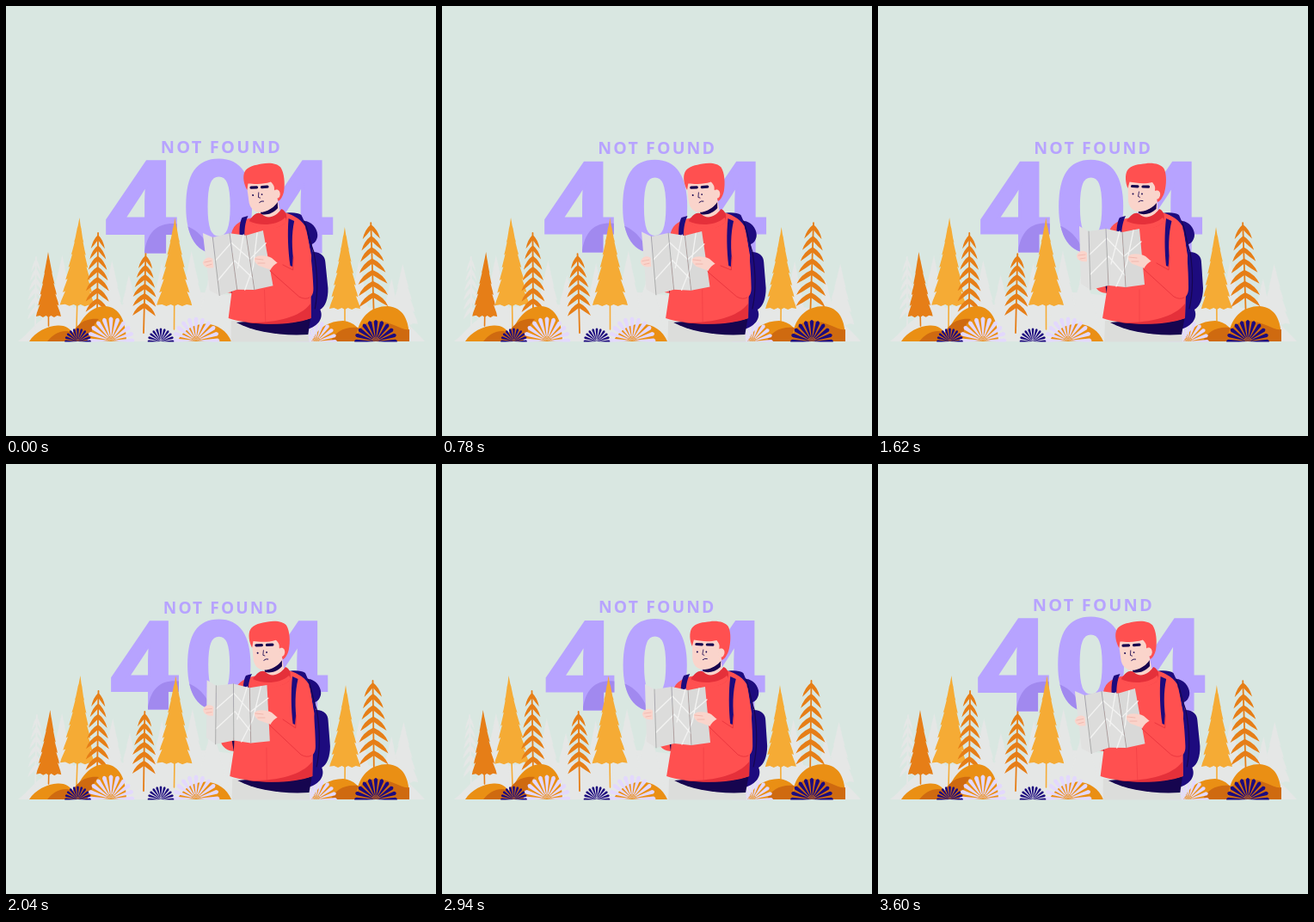
These frames come from a looping animation (500x500 px, 3630 ms). An HTML page:

```html
<!DOCTYPE html>
<html lang="en">
<head>
<meta charset="utf-8">
<title>Not found</title>
<style>
html, body { margin: 0; width: 100%; height: 100%; overflow: hidden; background: #d9e7e1; }
svg { display: block; width: 100vw; height: 100vh; }
text { font-family: "Open Sans", "Noto Sans", sans-serif; font-weight: 700; text-anchor: middle; }
</style>
</head>
<body>
<svg id="stage" viewBox="0 0 500 500"></svg>
<script>
// The cycle closes at CYCLE and its end pose rests for one step
const LOOP = 3630, CYCLE = 3600, STEP = 30, SWAY = CYCLE / 2;
const C = {
  mist: '#e5e7e6', yellow: '#f5ab35', orange: '#e67e17', hill: '#ea8f14', brown: '#cf6a10',
  navy: '#1d0b7e', ink: '#16054f', lilac: '#e3d8fd', violet: '#b7a3ff', shade: '#a189ef',
  red: '#ff5050', deep: '#e5303a', skin: '#fad4cb', blush: '#eeb0a6'
};
const stage = document.getElementById('stage');
const r1 = n => Math.round(n * 10) / 10;
const shape = (d, fill, extra = '') => `<path d="${d}" fill="${fill}" ${extra}/>`;
const line = (d, color, w = 1, extra = '') =>
  `<path d="${d}" fill="none" stroke="${color}" stroke-width="${w}" stroke-linecap="round" stroke-linejoin="round" ${extra}/>`;

// Conifer with its trunk foot at the origin
function fir(h, half, trunk, tiers, color) {
  const right = [], left = [], crown = h - trunk, gap = crown / tiers;
  const edge = (x, y) => {
    right.push(`${r1(x)} ${r1(y)}`);
    left.unshift(`${r1(-x)} ${r1(y)}`);
  };
  for (let i = 1; i <= tiers; i++) {
    const y = -h + gap * i, w = half * i / tiers;
    edge(w - half * 0.07, y - gap * 0.35);
    edge(w, y);
    if (i < tiers) edge(w * 0.83, y - 1.5);
  }
  const hem = [0.7, 0.45, 0.2, 0, -0.2, -0.45, -0.7].map((k, i) => `${r1(half * k)} ${-trunk + (i % 2 ? 1 : -1)}`);
  return shape(`M0 ${-h}L${right.join(' ')} ${hem.join(' ')} ${left.join(' ')}Z`, color) +
    line(`M0 0V${-trunk - 4}`, color, 1.6);
}

// Thin trunk with drooping, leaf-shaped branches
function fern(h, half, trunk, pairs, color) {
  const gap = (h - trunk - 8) / pairs;
  let d = '';
  for (let i = 0; i < pairs; i++) {
    const y = -h + 2 + i * gap, w = half * (0.6 + 0.4 * Math.min(1, i / (pairs - 3))), drop = gap * 0.75 + 7;
    for (const s of [-1, 1])
      d += `M0 ${r1(y)}Q${r1(s * w * 0.75)} ${r1(y + drop * 0.35)} ${r1(s * w)} ${r1(y + drop)}` +
           `Q${r1(s * w * 0.55)} ${r1(y + drop * 0.75)} 0 ${r1(y + 6)}Z`;
  }
  return shape(d, color) + line(`M0 0V${-h}`, color, 1.8);
}

// Half wheel of wedge petals
function fan(x, y, r, color, n = 11) {
  const gap = Math.PI / (n - 1), half = gap * 0.31;
  let d = '';
  for (let i = 0; i < n; i++) {
    const a = gap * i;
    const p = (q, k) => `${r1(x + Math.cos(q) * r * k)} ${r1(y - Math.sin(q) * r * k)}`;
    d += `M${x} ${y}L${p(a - half, 0.92)}Q${p(a, 1.08)} ${p(a + half, 0.92)}Z`;
  }
  return shape(d + `M${x - r * 0.2} ${y}a${r * 0.2} ${r * 0.2} 0 0 1 ${r * 0.4} 0Z`, color);
}

// x, y of the foot, height, sway in px at the tip, phase in degrees, drawing
const trees = [];
const tree = (x, y, h, amp, phase, art) => {
  trees.push({ x, y, amp, phase, h });
  return `<g data-tree="${trees.length - 1}">${art}</g>`;
};
const firAt = (x, y, h, half, trunk, tiers, color, amp, phase) =>
  tree(x, y, h, amp, phase, fir(h, half, trunk, tiers, color));
const fernAt = (x, y, h, half, trunk, pairs, color, amp, phase) =>
  tree(x, y, h, amp, phase, fern(h, half, trunk, pairs, color));

const digits = [[157.3, 4], [247.6, 0], [338.8, 4]]
  .map(([x, n]) => `<text x="${x}" y="286.4" font-size="147.5">${n}</text>`).join('');

const sign = `<g id="sign">
  <g fill="${C.violet}" stroke="${C.violet}" stroke-width="3.2">${digits}</g>
  <g mask="url(#digits)"><path d="M160 292C163 262 176 253 194 253C216 253 234 268 240 292Z" fill="${C.shade}"/></g>
  <text x="250.3" y="171" font-size="20" letter-spacing="2.2" fill="${C.violet}">NOT FOUND</text>
</g>`;

const mist = shape('M14 390C28 380 34 366 52 359C90 342 130 350 160 346C190 338 215 330 240 334C300 340 360 352 410 350C448 350 466 366 487 390Z', C.mist) +
  fernAt(34, 376, 84, 9, 10, 6, C.mist, 2, 60) +
  firAt(64, 380, 90, 19, 6, 5, C.mist, 1.5, 10) +
  firAt(123, 380, 84, 18, 6, 5, C.mist, 1.5, 80) +
  firAt(144, 385, 72, 16, 6, 4, C.mist, 1.5, 140) +
  firAt(180, 385, 86, 18, 6, 5, C.mist, 1.5, 30) +
  firAt(216, 385, 100, 21, 6, 5, C.mist, 1.5, 100) +
  firAt(240, 385, 80, 20, 6, 4, C.mist, 1.5, 160) +
  firAt(410, 385, 88, 18, 6, 5, C.mist, 1.5, 70) +
  firAt(447, 385, 68, 14, 6, 4, C.mist, 1.5, 20) +
  firAt(462, 382, 82, 17, 12, 5, C.mist, 1.5, 120);

const wood =
  firAt(49.5, 372, 86, 14.5, 11, 6, C.orange, 3, 100) +
  firAt(82, 374, 128, 20, 26, 7, C.yellow, 4.5, 40) +
  fernAt(106, 362, 98, 13.5, 4, 7, C.orange, 1.5, 45) +
  fernAt(160, 380, 92, 13.5, 18, 6, C.orange, 2.5, -10) +
  firAt(195.5, 376, 130, 20.5, 28, 7, C.yellow, 2, 60) +
  firAt(394, 370, 113, 18, 18, 7, C.yellow, 1.5, 95) +
  fernAt(428, 366, 114, 17, 14, 7, C.orange, 4, 160);

const hills =
  shape('M27 390C34 379 48 372 60 371.5C68 371 74 374 77 380L80 390Z', C.hill) +
  shape('M48 390C56 380 66 376 76 379L82 390Z', C.brown) +
  shape('M78 390C84 364 99 349 115 349C129 350 139 360 140 390Z', C.hill) +
  shape('M74 390C78 371 92 362 108 364C101 370 98 380 99 390Z', C.brown) +
  shape('M199 390C207 376 218 370 232 369.5C246 370 257 378 262 390Z', C.hill) +
  shape('M355 390C362 374 376 366 392 366C404 367 414 376 417 390Z', C.hill) +
  shape('M378 390C382 379 394 372 410 374L418 390Z', C.brown) +
  shape('M407 390C408 362 424 349 444 349C462 351 469 364 469 390Z', C.hill) +
  shape('M407 390C408 376 416 366 432 366C450 368 462 378 469 376V390Z', C.brown) +
  fan(122, 389, 27.5, C.lilac) + fan(83.5, 390, 15.5, C.navy) +
  fan(221, 389, 27.5, C.lilac) + fan(180, 390, 15.5, C.navy) +
  fan(361, 390, 24, C.lilac) + fan(430, 390, 25, C.navy);

const back =
  shape('M316 246C324 240 344 238 350 243L353 250C361 250 368 258 368 266C368 272 364 276 361 277L362 286C372 286 376 292 376 298L378 328C378 340 374 350 368 353C372 362 366 372 352 376H336Z', C.navy) +
  line('M353 250C358 261 358 274 363 286C366 306 367 330 362 352', C.ink, 1.2);

const trunk =
  shape('M264 366L263 392H354L352 364Z', '#dcdddb') +
  shape('M270 368C290 379 322 384 353 382L357 360Z', C.ink) +
  shape('M250 320L268 318L267 334C259 334 252 330 250 320Z', C.red) +
  shape('M264 322L271 322L266 335Z', C.ink) +
  shape('M294 246C281 248 271 253 268 264L268 300L266 332L261 363C284 371 330 372 357 363L358 335L360 290L354 256C348 246 338 242 327 239Z', C.red) +
  shape('M282 368C312 369 344 363 357 346V363C336 371 306 371 282 368Z', C.deep) +
  line('M304 330V368', C.deep, 0.7, 'opacity=".55"') +
  shape('M281 246L288 244C284 252 283 261 283 271H277.5C277 260 278 251 281 246Z', C.navy) +
  shape('M335 247L341.5 250C338 264 337 282 340 304L335 302C333 284 333 264 335 247Z', C.navy);

const head =
  shape('M302 228L324 222L326 246C319 251 309 250 303 244Z', C.skin) +
  shape('M303 236C311 239 318 236 324 229L323.5 236C317 242 309 243.5 303 241Z', C.ink) +
  shape('M290.5 200L291 227C292 235 297 239 305 239C315 238.5 323 231 325 222V200Z', C.skin) +
  shape('M290.5 212C287.5 205 287 196 290 191C294 184.5 304 184 311 183.2C320 182 329 184 332.5 189C336 196 335.5 208 333 217C331 223 328 227 325 228L322 214C323 210 321 207.5 319 205C309 207.5 299 205.5 292.5 204.5Z', C.red) +
  shape('M321 216C325 212.5 329 215.5 328 220.5C327 225 323 226 321 223Z', C.skin) +
  line('M295.5 209.5L302 209.8M308 210L314.5 210.2', C.ink, 3.2) +
  `<circle cx="296.5" cy="218.5" r="1"/><circle cx="307" cy="218.5" r=".9"/>` +
  line('M303.5 216L302.5 221.5L304.5 222.3', C.ink, 0.8) +
  line('M303 227.5Q305.5 225.5 308 226.5', C.ink, 0.9);

const collar =
  shape('M289 250C295 241 300 239 304 242C310 248 320 246 327 236C333 238 335 247 330 253C319 261 298 261 289 250Z', C.deep) +
  shape('M289 250C300 256 320 256 331 246C333 249 332 251 330 253C319 262 298 262 289 250Z', C.red);

const chart =
  shape('M234 256L245 262L247 330L236 323Z', '#e1e1e0') +
  shape('M245 262L265 259L268 325L247 330Z', '#dcdcdb') +
  shape('M265 259L284 263L288 327L268 325Z', '#dfdfde') +
  shape('M284 263L304 259L310 324L288 327Z', '#d9d9d8') +
  line('M246 289L266 270L286 291L306 274M247 312L268 291L287 313M271 300L281 262M277 326L289 300L297 261', '#f3f3f2', 1.3) +
  line('M245 262L247 330M265 259L268 325M284 263L288 327', '#969696', 0.7);

const farHand =
  shape('M243 287C239 283 233 285 231 290C231 295 236 298 243 297Z', C.skin) +
  line('M233 290L241 289M235 294L241 293', C.blush, 0.7);
const nearHand =
  shape('M291 291C295 287 305 288 311 291L319 298L312 306C306 303 301 302 296 300C292 297 290 294 291 291Z', C.skin) +
  line('M292 292L301 293M295 297L303 297', C.blush, 0.8);

stage.innerHTML = `<defs>
  <clipPath id="floor"><rect width="500" height="390.5"/></clipPath>
  <mask id="digits" maskUnits="userSpaceOnUse" x="0" y="0" width="500" height="500">
    <g fill="#fff" stroke="#fff" stroke-width="3.2">${digits}</g></mask>
</defs>
<rect width="500" height="500" fill="#d9e7e1"/>
<g clip-path="url(#floor)">${mist}${sign}${wood}${hills}
  <g class="lean">${back}${trunk}</g>
  <g class="lean"><g id="head" fill="${C.ink}">${head}</g>${collar}</g>
  <g id="chart">${chart}${farHand}</g>
  <g id="hand">${nearHand}</g>
  <path id="sleeve" fill="${C.red}"/>
  <path id="seam" fill="none" stroke="${C.deep}" stroke-width=".8" stroke-linecap="round"/>
</g>`;

const el = id => document.getElementById(id);
const treeEls = [...stage.querySelectorAll('[data-tree]')];
const leanEls = [...stage.querySelectorAll('.lean')];
const put = (node, tf) => node.setAttribute('transform', tf);

// Smooth periodic curve through poses at these times
const times = [0, 780, 1620, 2040, 2550, 2940];
const pose = {
  zoom: [1, 0.977, 0.977, 0.955, 0.951, 0.966],
  lean: [-6.5, -2.5, 0, -2, -1, 0.3],
  tilt: [-5, -5, 0, -4, -2, 0],
  handX: [-2, 0, 0, -2, -1, 2],
  handY: [2, 3, 0, -2, -1, 0],
  turn: [-5, -3, 0, 2.3, 1.7, 0]
};
function at(v, t) {
  const n = times.length;
  const T = k => times[(k + n) % n] + CYCLE * Math.floor(k / n);
  const V = k => v[(k + n) % n];
  const slope = k => (V(k + 1) - V(k - 1)) / (T(k + 1) - T(k - 1));
  let i = n - 1;
  while (times[i] > t) i--;
  const d = T(i + 1) - T(i), u = (t - T(i)) / d, w = 1 - u;
  return V(i) * w * w * (1 + 2 * u) + V(i + 1) * u * u * (3 - 2 * u) +
    d * u * w * (slope(i) * w - slope(i + 1) * u);
}

function draw(t) {
  const p = {};
  for (const k in pose) p[k] = at(pose[k], t);

  trees.forEach((o, i) => {
    const dx = o.amp * Math.cos(2 * Math.PI * t / SWAY - o.phase * Math.PI / 180);
    put(treeEls[i], `translate(${o.x} ${o.y}) rotate(${Math.atan2(dx, o.h) * 180 / Math.PI})`);
  });

  put(el('sign'), `translate(248 234) scale(${p.zoom}) translate(-248 -234)`);

  const k = p.lean / 185;
  leanEls.forEach(g => put(g, `matrix(1 0 ${-k} 1 ${k * 430} 0)`));
  put(el('head'), `rotate(${p.tilt} 313 242)`);
  put(el('chart'), `translate(${p.handX} ${p.handY}) rotate(${p.turn} 302 295)`);
  put(el('hand'), `translate(${p.handX} ${p.handY})`);

  const B = (x, y) => `${x + k * (430 - y)} ${y}`;
  const H = (x, y) => `${x + p.handX} ${y + p.handY}`;
  el('sleeve').setAttribute('d', `M${B(342, 262)}L${B(355, 260)}C${B(359, 280)} ${B(361, 305)} ${B(361, 328)}` +
    `C${B(361, 340)} ${B(353, 343)} ${B(344, 338)}L${H(309, 306)}Q${H(312, 299)} ${H(319, 296)}L${B(337, 308)}Z`);
  el('seam').setAttribute('d', `M${B(339, 292)}L${B(338, 307)}L${H(324, 299)}` +
    `M${H(309, 306)}L${B(344, 338)}Q${B(351, 342)} ${B(356, 339)}`);
}

function tick(now) {
  const t = Math.floor(now % LOOP / STEP) * STEP;
  draw(t % CYCLE);
  requestAnimationFrame(tick);
}
draw(0);
requestAnimationFrame(tick);
</script>
</body>
</html>
```
